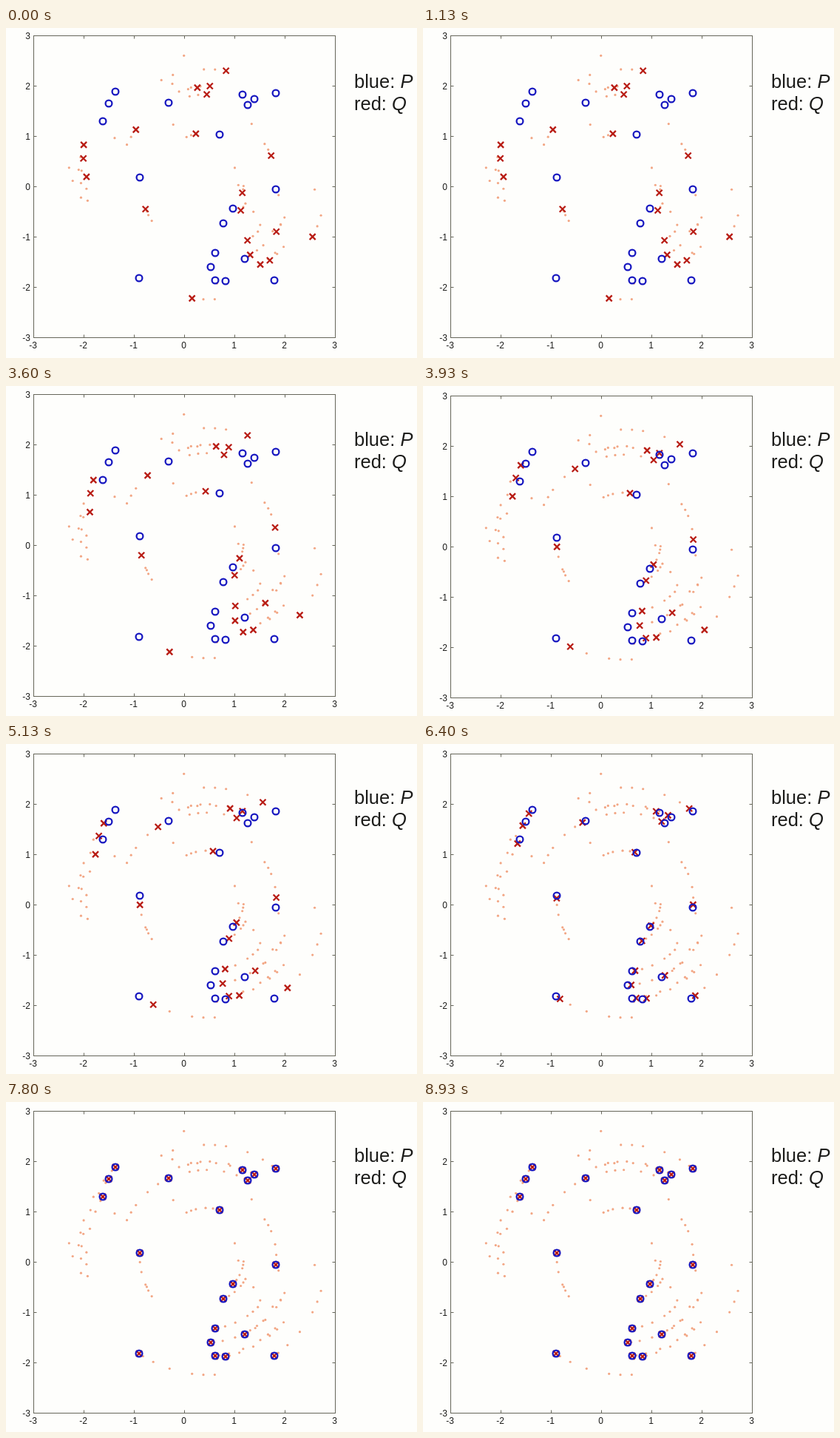
Recreate the animation shown at these times as an HTML page with a canvas. Size 556x446 px, loop 8990 ms.

```html
<!DOCTYPE html>
<html lang="en">
<head>
<meta charset="utf-8">
<title>Point set registration</title>
<style>
  html, body { margin: 0; width: 100%; height: 100%; overflow: hidden; background: #fefefc; }
  canvas { display: block; }
</style>
</head>
<body>
<canvas id="stage" width="556" height="446"></canvas>
<script>
const ctx = document.getElementById('stage').getContext('2d');
const LOOP = 8990, STEP = 1900, FIRST_SHOWN = 3, LAST = 7;
const UNIT = 68, LEFT = 37.5, TOP = 10.5, SIZE = 6 * UNIT;
const FONT = '"Liberation Sans", Arial, sans-serif';

// The fixed cloud P; every position of Q is derived from it
const fixedPoints = [
  [148, 86], [139, 102], [131, 126], [220, 101], [320, 90],
  [327, 104], [336, 96], [365, 88], [289, 144], [181, 202],
  [365, 218], [307, 244], [294, 264], [283, 304], [277, 323],
  [283, 341], [297, 342], [323, 312], [363, 341], [180, 338]
];

// Degrees still to turn: steady at first, then easing out to zero
function remainingTurn(iteration) {
  const left = (LAST - iteration) / (LAST - FIRST_SHOWN);
  return left > 1 ? 28 + 5.6 * (FIRST_SHOWN - iteration) : 28 * left ** 1.8;
}

function movingCloud(iteration) {
  const degrees = remainingTurn(iteration), angle = -degrees * Math.PI / 180;
  const cos = Math.cos(angle), sin = Math.sin(angle);
  // The first iteration also removes the initial displacement
  const displaced = iteration === 0 ? 1 : 0;
  const centreX = 264 + degrees * 0.13 - displaced * 12;
  const centreY = 214 + degrees * 0.087 - displaced * 20;
  return fixedPoints.map(([px, py]) => {
    const x = px - 264, y = py - 214;
    return [centreX + cos * x - sin * y, centreY + sin * x + cos * y];
  });
}

const clouds = Array.from({ length: LAST + 1 }, (_, i) => movingCloud(i));

// Whole-pixel vertical sway of the plot between iterations
const plotShift = step => Math.round(3 * Math.sin(0.58 * step) ** 2);

function line(x1, y1, x2, y2) {
  ctx.moveTo(x1, y1);
  ctx.lineTo(x2, y2);
}

function drawAxes() {
  ctx.strokeStyle = '#66665a';
  ctx.lineWidth = 1;
  ctx.strokeRect(LEFT, TOP, SIZE, SIZE);
  ctx.fillStyle = '#1c1c1a';
  ctx.font = '12px ' + FONT;
  ctx.beginPath();
  for (let i = 0; i <= 6; i++) {
    const x = LEFT + i * UNIT, y = TOP + i * UNIT;
    line(x, TOP, x, TOP + 4);
    line(x, TOP + SIZE, x, TOP + SIZE - 4);
    line(LEFT, y, LEFT + 4, y);
    line(LEFT + SIZE, y, LEFT + SIZE - 4, y);
    ctx.textAlign = 'center';
    ctx.fillText(i - 3, x - 1, TOP + SIZE + 14.5);
    ctx.textAlign = 'right';
    ctx.fillText(3 - i, 33, y + 4.5);
  }
  ctx.stroke();
}

function drawDot([x, y]) {
  ctx.beginPath();
  ctx.arc(x, y, 1.6, 0, 2 * Math.PI);
  ctx.fill();
}

function drawCross([x, y]) {
  ctx.beginPath();
  line(x - 4, y - 4, x + 4, y + 4);
  line(x - 4, y + 4, x + 4, y - 4);
  ctx.stroke();
}

function drawCircle([x, y]) {
  ctx.beginPath();
  ctx.arc(x, y, 4.4, 0, 2 * Math.PI);
  ctx.stroke();
}

function drawLabel(word, symbol, y) {
  ctx.textAlign = 'left';
  ctx.fillStyle = '#1c1c1a';
  ctx.font = '25.5px ' + FONT;
  ctx.fillText(word, 471, y);
  const width = ctx.measureText(word).width;
  ctx.font = 'italic 25.5px ' + FONT;
  ctx.fillText(symbol, 471 + width, y);
}

function draw(time) {
  const step = Math.floor(time % LOOP / STEP);
  const current = FIRST_SHOWN + step;

  ctx.fillStyle = '#fefefc';
  ctx.fillRect(0, 0, 556, 446);
  ctx.save();
  ctx.translate(0, plotShift(step));
  drawAxes();
  ctx.fillStyle = '#f2a684';
  clouds.slice(0, current).flat().forEach(drawDot);
  ctx.lineWidth = 2.3;
  ctx.strokeStyle = '#b81c14';
  clouds[current].forEach(drawCross);
  ctx.strokeStyle = '#1818c0';
  fixedPoints.forEach(drawCircle);
  ctx.restore();

  drawLabel('blue: ', 'P', 81);
  drawLabel('red: ', 'Q', 111);
}

const start = performance.now();
function tick() {
  draw(performance.now() - start);
  requestAnimationFrame(tick);
}
tick();
</script>
</body>
</html>
```
